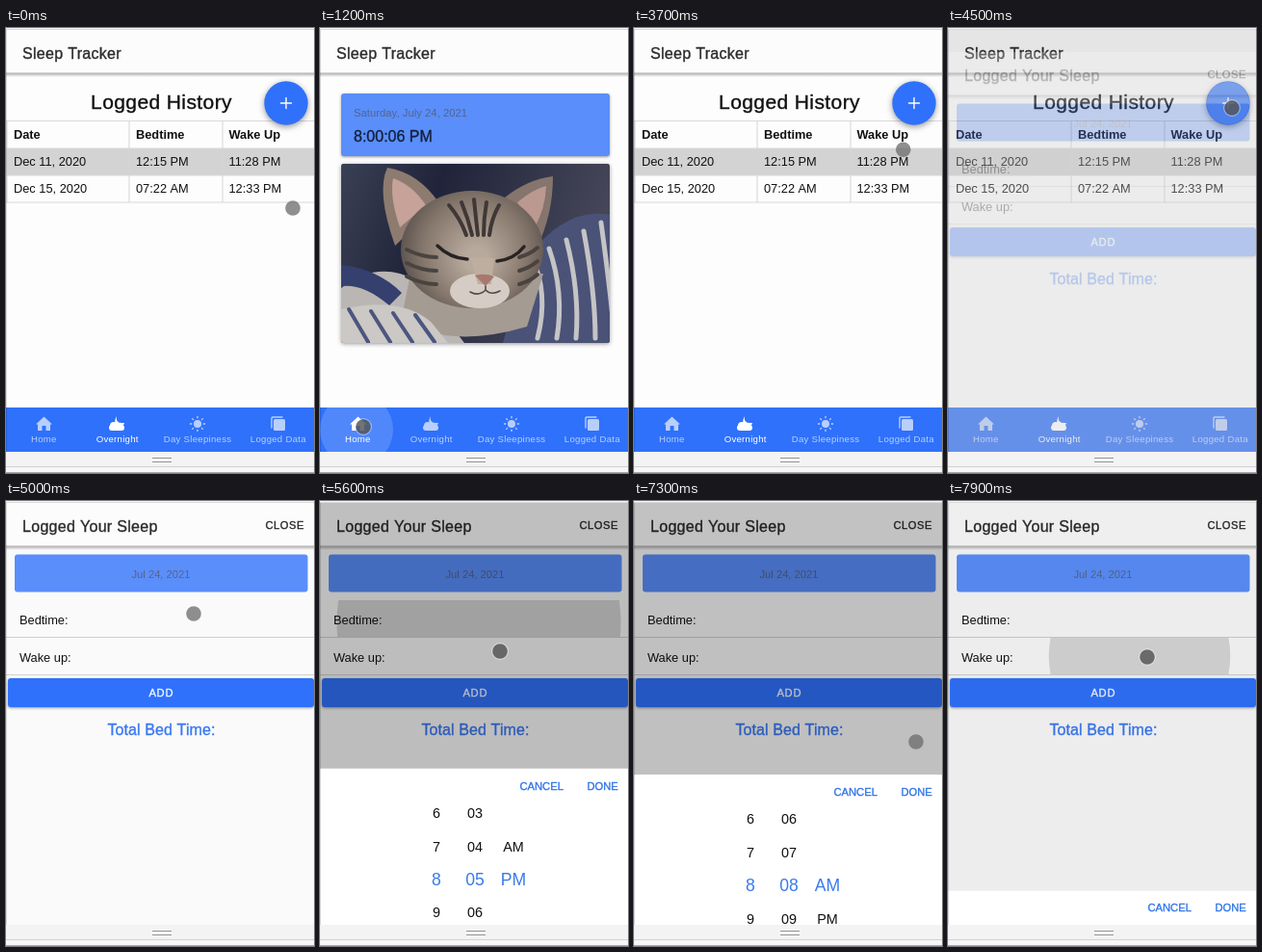
Write an HTML page with a canvas that moves like this. It is 320 px wide and 462 px high and loops after 8000 ms.

```html
<!DOCTYPE html>
<html lang="en">
<head>
<meta charset="utf-8">
<title>Sleep Tracker</title>
<style>
html, body { margin: 0; width: 100%; height: 100%; overflow: hidden; background: #fdfdfd; }
canvas { display: block; width: 320px; height: 462px; }
</style>
</head>
<body>
<canvas id="stage"></canvas>
<script>
const W = 320, H = 462, LOOP = 8000, STEP = 100;
const BLUE = '#2f71fb', CARD = '#5a8efb', PAGE = '#fdfdfd', INK = '#2b2b2b';
const dpr = window.devicePixelRatio || 1;

function surface(el) {
  el.width = W * dpr;
  el.height = H * dpr;
  const ctx = el.getContext('2d');
  ctx.scale(dpr, dpr);
  return ctx;
}
const stage = surface(document.getElementById('stage'));
const sheet = surface(document.createElement('canvas'));
let c = stage;

// Keys are [time, value, value...]; linear in between.
function track(t, keys) {
  const i = keys.findIndex(k => k[0] > t);
  if (i < 0) return keys[keys.length - 1].slice(1);
  if (i === 0) return keys[0].slice(1);
  const a = keys[i - 1], b = keys[i], p = (t - a[0]) / (b[0] - a[0]);
  return a.slice(1).map((v, n) => v + (b[n + 1] - v) * p);
}
const within = (t, spans) => spans.some(([a, b]) => t >= a && t <= b);

function rect(x, y, w, h, color, r = 0) {
  c.fillStyle = color;
  c.beginPath();
  c.roundRect(x, y, w, h, r);
  c.fill();
}
function disc(x, y, rx, color, ry = rx) {
  c.fillStyle = color;
  c.beginPath();
  c.ellipse(x, y, rx, ry, 0, 0, 7);
  c.fill();
}
function shape(path, color) {
  c.fillStyle = color;
  c.fill(new Path2D(path));
}
function stroke(path, color, width) {
  c.strokeStyle = color;
  c.lineWidth = width;
  c.lineCap = 'round';
  c.stroke(new Path2D(path));
}
function clipped(x, y, w, h, draw) {
  c.save();
  c.beginPath();
  c.rect(x, y, w, h);
  c.clip();
  draw();
  c.restore();
}
function shadowed(blur, dy, draw) {
  c.save();
  c.shadowColor = 'rgba(0,0,0,.4)';
  c.shadowBlur = blur * dpr;
  c.shadowOffsetY = dy * dpr;
  draw();
  c.restore();
}
function text(s, x, y, size, color, { weight = 400, gap = 0, align = 'left' } = {}) {
  c.font = `${weight === 700 ? 'bold ' : ''}${size}px "Liberation Sans", Arial, sans-serif`;
  c.letterSpacing = gap + 'px';
  c.textAlign = align;
  c.fillStyle = c.strokeStyle = color;
  c.fillText(s, x, y);
  if (weight === 500) {
    c.lineWidth = 0.35;
    c.strokeText(s, x, y);
  }
}

function header(title) {
  rect(0, 2, W, 45, '#fcfcfc');
  const g = c.createLinearGradient(0, 46, 0, 51);
  g.addColorStop(0, 'rgba(0,0,0,.36)');
  g.addColorStop(1, 'rgba(0,0,0,0)');
  rect(0, 46.5, W, 4.5, g);
  text(title, 17, 31.5, 16, INK, { weight: 500, gap: 0.3 });
}

function ripple(t, x, y, start, end, speed, max, color) {
  const [fade] = track(t, [[end, 1], [end + 300, 0]]);
  if (t < start || !fade) return;
  c.globalAlpha = fade;
  disc(x, y, Math.min(max, (t - start) * speed), color);
  c.globalAlpha = 1;
}

function history(t) {
  text('Logged History', 161.5, 83.5, 21, '#111', { weight: 500, gap: 0.4, align: 'center' });
  rect(0, 125, W, 28, '#d3d3d3');
  for (const y of [96, 124.5, 152.5, 180.5]) rect(0, y, W, 1, '#dadada');
  for (const x of [0.5, 127.5, 224.5]) rect(x, 96, 1, 85, '#d6d6d6');
  const rows = [
    ['Date', 'Bedtime', 'Wake Up'],
    ['Dec 11, 2020', '12:15 PM', '11:28 PM'],
    ['Dec 15, 2020', '07:22 AM', '12:33 PM']
  ];
  rows.forEach((row, i) => row.forEach((s, n) =>
    text(s, [8, 135, 231.5][n], 115 + 28 * i, 12.8, '#111', { weight: i ? 400 : 700 })));
  shadowed(6, 2, () => disc(291, 78, 22.7, BLUE));
  clipped(268, 55, 46, 46, () => ripple(t, 291, 78, 4200, 4500, 0.1, 22, 'rgba(255,255,255,.16)'));
  stroke('M285.5 78H296.5M291 72.5V83.5', '#fff', 1.4);
}

function kitten() {
  const g = c.createLinearGradient(22, 141, 301, 240);
  g.addColorStop(0, '#3a4055');
  g.addColorStop(0.35, '#20243a');
  g.addColorStop(1, '#4a4a5c');
  rect(22, 141, 279, 186, g);
  shape('M22 270Q60 240 100 262L150 327H22Z', '#b9b6b4');
  shape('M22 246Q60 250 85 275L72 288Q45 265 22 268Z', '#35406f');
  shape('M214 240Q255 185 301 194V327H190Z', '#4a5277');
  for (let i = 0; i < 5; i++)
    stroke(`M${220 + i * 18} ${238 - i * 9}Q${238 + i * 16} 275 ${226 + i * 20} 322`, '#c5c4c6', 5);
  shape('M95 250L85 300Q130 335 215 310L232 255Z', '#a49b93');
  shape('M78 226Q58 170 70 145Q102 150 124 182Z', '#8d7b70');
  shape('M83 207Q72 175 76 156Q96 163 110 184Z', '#c6a299');
  shape('M192 176Q216 157 242 154Q242 195 225 228Z', '#85756c');
  shape('M205 181Q222 167 235 164Q234 188 223 207Z', '#bb9990');
  const fur = c.createRadialGradient(163, 240, 12, 160, 228, 82);
  fur.addColorStop(0, '#b7a99c');
  fur.addColorStop(0.6, '#85776c');
  fur.addColorStop(1, '#554d49');
  disc(158, 230, 74, fur, 61);
  for (let i = -2; i <= 2; i++)
    stroke(`M${160 + i * 13} ${178 + Math.abs(i) * 3}Q${162 + i * 8} 198 ${164 + i * 6} 215`, '#3f3836', 4);
  for (const y of [238, 252, 266]) {
    stroke(`M90 ${y - 8}Q106 ${y} 121 ${y}`, '#4a4340', 4);
    stroke(`M207 ${y}Q218 ${y - 3} 226 ${y - 10}`, '#4a4340', 4);
  }
  disc(166, 273, 31, '#d5cdc5', 18);
  shape('M156 238L181 239L178 266L164 266Z', '#bdaea0');
  stroke('M122 226Q135 239 153 240', '#272322', 3.5);
  stroke('M184 242Q202 240 212 227', '#272322', 3.5);
  shape('M161 257Q171 254 181 258L172 268Z', '#a8776d');
  stroke('M172 268V272Q165 279 156 274M172 272Q178 278 187 273', '#5b4843', 1.6);
  shape('M22 292Q85 278 116 306L133 327H22Z', '#cbc8c5');
  for (let i = 0; i < 4; i++)
    stroke(`M${30 + i * 23} ${292 + i * 2}L${50 + i * 23} 326`, '#4c567f', 4);
}

function home(t) {
  shadowed(3, 1, () => rect(22, 68, 279, 65, CARD, 3));
  text('Saturday, July 24, 2021', 35, 92, 11.2, '#53648c', { gap: 0.06 });
  text(`8:00:0${t < 2000 ? 6 : 7} PM`, 35, 117.5, 16, '#14203c', { weight: 500 });
  shadowed(4, 1, () => rect(22, 141, 279, 186, '#333849', 3));
  c.save();
  c.beginPath();
  c.roundRect(22, 141, 279, 186, 3);
  c.clip();
  kitten();
  c.restore();
}

const icons = [
  col => shape('M31 411.5L39.5 403.5L48 411.5H46V418H41.5V413H37.5V418H33V411.5Z', col),
  col => {
    shape('M115 403Q113 411 123 410Q121 416 116 414Q111 409 115 403Z', col);
    disc(112, 413, 4, col);
    rect(107, 412, 16, 6, col, 3);
  },
  col => {
    disc(199, 411, 4, col);
    for (let i = 0; i < 8; i++) {
      const x = Math.cos(i * Math.PI / 4), y = Math.sin(i * Math.PI / 4);
      stroke(`M${199 + x * 6.2} ${411 + y * 6.2}L${199 + x * 7.6} ${411 + y * 7.6}`, col, 1.3);
    }
  },
  col => {
    stroke('M276 415V405Q276 404 277 404H287', col, 1.4);
    rect(278, 406, 12, 12, col, 1.5);
  }
];

function tabs(t, active) {
  rect(0, 394, W, 46, BLUE);
  clipped(0, 394, W, 46, () => {
    ripple(t, 38, 417, 1000, 1300, 0.19, 38, 'rgba(255,255,255,.16)');
    ripple(t, 116, 417, 2400, 2700, 0.17, 38, 'rgba(255,255,255,.16)');
  });
  ['Home', 'Overnight', 'Day Sleepiness', 'Logged Data'].forEach((s, i) => {
    const col = i === active ? '#fff' : '#b9cffb';
    icons[i](col);
    text(s, [39.3, 115.7, 199, 282.8][i], 430, 9.6, col, { gap: 0.28, align: 'center' });
  });
}

function form(t) {
  const mid = { align: 'center' };
  rect(0, 2, W, 438, '#fafafa');
  header('Logged Your Sleep');
  text('CLOSE', 269.5, 29.3, 11.2, INK, { weight: 500, gap: 0.5 });
  rect(9, 55.5, 304.5, 39, CARD, 3);
  text('Jul 24, 2021', 161, 79.5, 11.2, '#56658a', mid);
  clipped(0, 103, W, 38, () => ripple(t, 165, 126, 5240, 5700, 0.41, 148, 'rgba(0,0,0,.15)'));
  clipped(0, 142, W, 38, () => ripple(t, 199, 161, 7670, 8000, 0.41, 148, 'rgba(0,0,0,.14)'));
  text('Bedtime:', 14, 128, 12.8, '#111');
  text('Wake up:', 14, 167, 12.8, '#111');
  rect(0, 141, W, 1, '#cfcfcf');
  rect(0, 180, W, 1, '#cfcfcf');
  shadowed(3, 1, () => rect(2, 184, 318, 30, BLUE, 3));
  text('ADD', 161.3, 203, 11.2, '#f4f7ff', { weight: 500, gap: 0.7, align: 'center' });
  text('Total Bed Time:', 161.5, 242.5, 16, '#3a78f3', { weight: 500, gap: 0.1, align: 'center' });
}

function column(x, top, pos, first, last, label) {
  for (let n = first; n <= last; n++) {
    const d = n - pos, on = Math.abs(d) < 0.5;
    if (Math.abs(d) > 3.5) continue;
    const size = on ? 17.6 : 14.4;
    text(label(n), x, top + 115 + d * 34.4 + size * 0.36, size, on ? '#3a7bea' : '#111', { align: 'center' });
  }
}

function picker(t) {
  const [open] = track(t, [[5400, 0], [5500, 0.42], [5600, 0.78], [5700, 0.94], [5800, 1],
    [7200, 1], [7300, 0.75], [7400, 0.2], [7500, 0], [7800, 0], [7900, 0.17]]);
  if (!open) return;
  const top = 440 - 208 * open;
  rect(0, 2, W, 438, `rgba(0,0,0,${0.31 * open})`);
  rect(0, top, W, 208, '#fff');
  text('CANCEL', 207.5, top + 21.8, 11.2, '#2f74e8', { weight: 500 });
  text('DONE', 277.5, top + 21.8, 11.2, '#2f74e8', { weight: 500 });
  const again = t > 7600;
  const [minute] = again ? [5] : track(t, [[6500, 5], [6600, 5.8], [6700, 7], [6800, 7.8], [6900, 8]]);
  const [half] = again ? [1] : track(t, [[6000, 1], [6300, 0.1], [6400, 0]]);
  clipped(0, top + 36, W, 172, () => {
    column(121, top, 8, 1, 12, String);
    column(161, top, minute, 0, 59, n => String(n).padStart(2, '0'));
    column(201, top, half, 0, 1, n => ['AM', 'PM'][n]);
  });
}

function frameEdges() {
  rect(0, 0, W, 2, '#f6f6f6');
  rect(0, 1, W, 1, '#d9d9d9');
  rect(0, 2, 1, 438, 'rgba(0,0,0,.14)');
  rect(0, 440, W, 22, '#f3f3f3');
  rect(152, 446, 20, 1, '#949494');
  rect(152, 450, 20, 1, '#949494');
  rect(0, 455, W, 1, '#d2d2d2');
  rect(0, 456, W, 5, '#f4f6f8');
  rect(0, 461, W, 1, '#a9a9a9');
}

const path = [
  [0, 298, 187], [200, 306, 200], [500, 205, 320], [900, 48, 412], [1200, 45, 414],
  [1800, 50, 413], [2300, 104, 418], [2600, 106, 418], [2800, 110, 410], [3100, 150, 350],
  [3600, 275, 140], [4000, 294, 85], [4500, 295, 83], [4700, 285, 90], [5100, 165, 126],
  [5400, 165, 128], [5600, 187, 156], [5900, 201, 335], [6000, 201, 345], [6300, 202, 385],
  [6500, 165, 350], [6600, 166, 325], [6800, 173, 244], [7100, 290, 250], [7300, 293, 250],
  [7600, 205, 162], [7900, 207, 162]
];
const presses = [[1000, 1200], [2400, 2600], [4300, 4500], [5200, 5600],
  [6000, 6300], [6500, 6700], [7200, 7200], [7700, 7900]];

function pointer(t) {
  const [x, y] = track(t, path);
  if (within(t, presses)) {
    disc(x, y, 9, 'rgba(255,255,255,.4)');
    disc(x, y, 7.8, 'rgba(55,55,55,.7)');
  } else {
    disc(x, y, 7.8, 'rgba(108,108,108,.76)');
  }
}

function draw(t) {
  c = stage;
  const atHome = t >= 1200 && t < 2600;
  const [shown] = track(t, [[4400, 0], [4500, 0.28], [4600, 0.78], [4700, 0.96], [4800, 1]]);
  rect(0, 0, W, H, PAGE);
  if (shown < 1) {
    header('Sleep Tracker');
    atHome ? home(t) : history(t);
    tabs(t, atHome ? 0 : 1);
  }
  if (shown) {
    rect(0, 2, W, 438, `rgba(0,0,0,${0.32 * shown})`);
    c = sheet;
    c.clearRect(0, 0, W, H);
    form(t);
    c = stage;
    c.globalAlpha = shown;
    c.drawImage(sheet.canvas, 0, 32 * (1 - shown), W, H);
    c.globalAlpha = 1;
  }
  picker(t);
  frameEdges();
  pointer(t);
}

const began = performance.now();
function tick() {
  const t = Math.max(0, performance.now() - began) % LOOP;
  draw(Math.floor(t / STEP) * STEP);
  requestAnimationFrame(tick);
}
tick();
</script>
</body>
</html>
```
